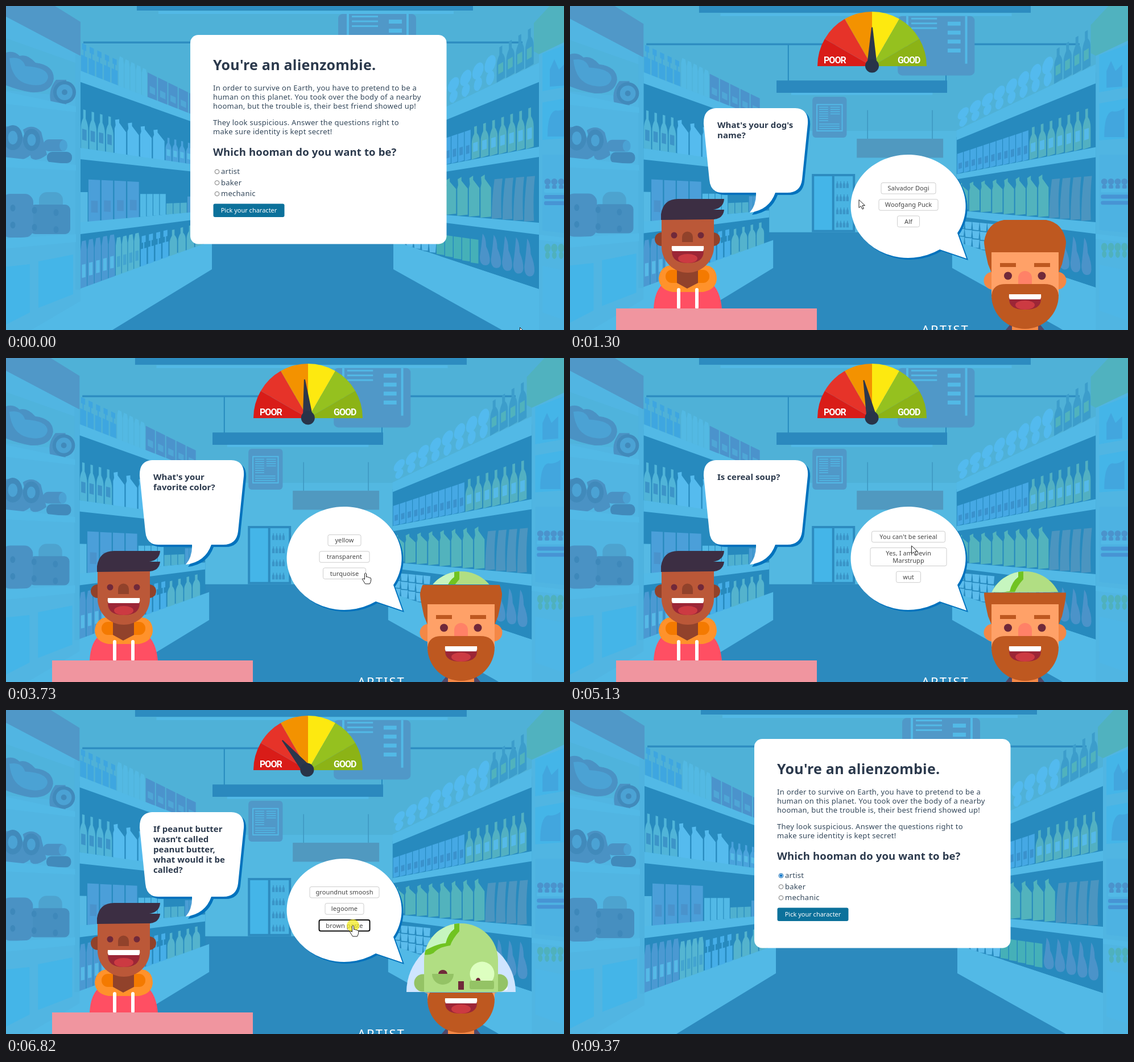
Write an HTML page that moves like this. It is 981 px wide and 571 px high and loops after 9.68 s.

```html
<!DOCTYPE html>
<html lang="en">
<head>
<meta charset="utf-8">
<title>Alienzombie quiz</title>
<style>
html,body{margin:0;width:100%;height:100%;overflow:hidden;background:#51b4dc}
svg{display:block;width:981px;height:571px}
text{font-family:"Noto Sans","Open Sans",sans-serif;fill:#33475a;white-space:pre}
.h1{font-size:25px;font-weight:700;letter-spacing:.22px;fill:#2b394c}
.h2{font-size:18.5px;font-weight:700;letter-spacing:.14px;fill:#2b394c}
.h3{font-size:19px;font-weight:700;letter-spacing:.15px;fill:#1f3440}
.p{font-size:13px;letter-spacing:.27px}
.btn{font-size:11px;font-weight:500;fill:#fff}
.q{font-size:15px;font-weight:700;letter-spacing:.03px;fill:#2b394c}
.a{font-size:11px;letter-spacing:.1px;fill:#444}
.dial{font:700 16px Roboto,"Open Sans",sans-serif;letter-spacing:-1px;fill:#fff}
.job{font-size:22px;letter-spacing:2px;fill:#fff}
.mid{text-anchor:middle}
</style>
</head>
<body>
<svg id="stage" viewBox="0 0 981 571"></svg>
<script>
const LOOP = 9680;
const rect = (x, y, w, h, fill, r = 0, more = '') =>
  `<rect x="${x}" y="${y}" width="${w}" height="${h}" rx="${r}" fill="${fill}" ${more}/>`;
const path = (d, fill, more = '') => `<path d="${d}" fill="${fill}" ${more}/>`;
const dot = (x, y, r, fill, more = '') => `<circle cx="${x}" cy="${y}" r="${r}" fill="${fill}" ${more}/>`;
const oval = (x, y, rx, ry, fill) => `<ellipse cx="${x}" cy="${y}" rx="${rx}" ry="${ry}" fill="${fill}"/>`;
const label = (x, y, cls, s) => `<text x="${x}" y="${y}" class="${cls}">${s}</text>`;
const group = (id, s, more = '') => `<g id="${id}" ${more}>${s}</g>`;
const many = (n, draw) => Array.from({length: n}, (_, i) => draw(i)).join('');

const DARK = '#278abe', LIGHT = '#52b9e6', MID = '#5098c8', BRIGHT = '#44b5e8', INK = '#2c374c';

// Product outlines in a unit box
const SHAPES = {
  box: 'M0 0H.9V1H0z',
  bottle: 'M.32 0H.62V.22Q.92.35.92.5V1H.04V.5Q.04.35.32.22z',
  jug: 'M.08.05L.4 0V.1L.94.32V1H.04V.3L.12.2z',
  carton: 'M.2 0H.75L.9.2V1H0V.2z',
  ball: 'M.5 0A.46.28 0 0 1 .5.56A.46.28 0 0 1 .5 0M.5.5A.46.26 0 0 1 .5 1A.46.26 0 0 1 .5.5',
  drop: 'M.3 0Q.6.1.62.4Q.98.65.95.85Q.9 1 .5 1Q.05 1 .05.75Q.2.4.3 0z',
  stem: 'M.2 0H.75V.22H.56V.42H.88V1H.08V.42H.4V.22H.2z',
  bag: 'M.25 0H1Q.8.4.9 1H0Q0 .5.25 0z',
  cups: 'M0 0H.95L.85.3H.1zM0 .34H.95L.85.64H.1zM0 .68H.95L.85 1H.1z'
};
function put(kind, fill, x, y, w, h, skew = 0, band) {
  const m = `transform="matrix(${w} ${skew} 0 ${h} ${x} ${y})"`;
  return path(SHAPES[kind], fill, m) + (band ? path('M.2.5H.72V.78H.2z', band, m) : '');
}

// One side of the shop: every shelf is a sloping line, and heights shrink with depth.
// goods: [kind, fill, count, end x, height at the near edge, band]
function aisle(near, far, vanish, first, shelves) {
  const depth = x => (vanish - x) / (vanish - near);
  return shelves.map(({y, slope, thick, goods}) => {
    const line = x => y + slope * Math.abs(x - near);
    let from = first;
    const items = goods.map(([kind, fill, n, to, tall, band]) => {
      const w = (to - from) / n, x0 = from, top = x => line(x) - tall * depth(x);
      from = to;
      return many(n, i => {
        const x = x0 + w * i;
        return put(kind, fill, x, top(x), w, tall * depth(x), top(x + w) - top(x), band);
      });
    }).join('');
    const board = `M${near} ${line(near)}L${far} ${line(far)}v${thick * depth(far)}L${near} ${line(near) + thick}z`;
    return items + path(board, LIGHT);
  }).join('');
}
const leftAisle = () => path('M131 124L355 212V415L131 498z', DARK) +
  aisle(131, 355, 685, 131, [
    {y: 114, slope: .393, thick: 20, goods: [['stem', '#3ea6e0', 5, 198, 50], ['carton', '#53b9e3', 5, 249, 60], ['box', '#4b93cc', 5, 340, 55, '#4fa6d6']]},
    {y: 250, slope: .147, thick: 20, goods: [['bottle', '#50b4d8', 4, 190, 69, '#3c94c8'], ['jug', '#55bbee', 4, 280, 69], ['bottle', '#4aa3dc', 6, 352, 56, '#56bbe6']]},
    {y: 381, slope: -.089, thick: 21, goods: [['box', '#55b9e4', 1, 145, 53], ['box', '#4b9fd9', 4, 236, 76, '#4a93cc'], ['box', LIGHT, 4, 282, 50], ['box', '#4fb0cf', 3, 319, 27], ['box', '#4a9dd4', 4, 349, 43]]},
    {y: 498, slope: -.364, thick: 0, goods: [['carton', '#4b99d2', 5, 193, 83, '#56b9e6'], ['carton', '#54b5d2', 4, 236, 75, '#43a4d0'], ['stem', '#46aee8', 4, 287, 66], ['bottle', '#54b3cd', 4, 347, 63]]}
  ]) + path('M131 498L362 414V464L187 571L140 600H-5V480z', LIGHT);
const rightAisle = () => path('M689 230L937 115V499L689 416z', DARK) +
  aisle(937, 689, 434, 690, [
    {y: 100, slope: .476, thick: 34, goods: [['ball', '#53baee', 8, 862, 64], ['bottle', '#3c9dcb', 4, 929, 70, '#50b2bd']]},
    {y: 248, slope: .194, thick: 18, goods: [['box', '#45a8e4', 11, 818, 70, '#3a92cd'], ['bottle', '#52b0c2', 7, 929, 74, '#55b9e8']]},
    {y: 382, slope: -.085, thick: 21, goods: [['jug', '#52b3bd', 8, 854, 95], ['bag', '#4b95c0', 4, 930, 83]]},
    {y: 482, slope: -.25, thick: 0, goods: [['cups', '#5cbcec', 5, 757, 80], ['box', '#45b0b8', 5, 832, 55], ['drop', '#4b93c9', 5, 930, 70]]}
  ]) + path('M681 414L937 499V600H920L872 571L681 464z', LIGHT);

const stripes = (x, y, w, n, gap, h = 3) => many(n, i => rect(x, y + i * gap, w, h, LIGHT));
function backWall() {
  return rect(-5, -10, 1010, 610, '#53b8e1') + rect(-5, -10, 1010, 229, '#4fb1d7') +
    rect(230, -10, 591, 18, '#2d8cc0') + rect(268, 9, 519, 5, LIGHT) +
    rect(136, 62.5, 772, 3.5, '#2e8dc1') +
    rect(388, 65, 2, 65, DARK) + rect(669, 115, 2, 16, DARK) +
    rect(584, 14, 137, 106, MID, 8) + rect(599, 14, 4, 85, LIGHT) + rect(704, 14, 4, 85, LIGHT) +
    stripes(608, 17, 46, 3, 8.5) + stripes(673, 24, 23, 4, 16, 7) +
    rect(368, 129, 304, 22, '#2b89be') + rect(394, 151, 252, 4, LIGHT) +
    rect(432, 158, 61, 73, MID, 6) + rect(439, 171, 47, 49, LIGHT) + rect(441, 173, 43, 45, MID) +
    stripes(444, 176, 16, 7, 4, 1.5) + stripes(464, 176, 17, 4, 4, 1.5) + stripes(444, 206, 36, 3, 4, 1.5) +
    rect(529.5, 182, 1.5, 52, '#3d97c0') + rect(645, 182, 1.5, 52, '#3d97c0') +
    rect(511, 233, 154, 34, '#5099c0') +
    path('M340 400H700L930 600H130z', '#2c8abe') +
    rect(431, 296, 77, 104, '#2d8bbf') + rect(435, 300, 32, 96, BRIGHT) + rect(471, 300, 33, 96, '#49b3e2') +
    many(16, i => put('bottle', '#3a95c8', 474 + i % 4 * 6, 309 + (i >> 2) * 23.5, 5, 12)) +
    rect(627, 335, 28, 22, '#50b6e8') + rect(552, 357, 104, 60, '#55bae5') + rect(552, 356, 70, 2.5, DARK) +
    many(3, i => rect(551, 374 + i * 15.5, 107, 2, '#4cb0dd'));
}
function leftFridge() {
  const meat = '#4a92c4', deep = '#418abb', cut = '#4ba2d4';
  const ring = (x, y, r) => oval(x, y, r, r * 1.3, deep) + oval(x, y, r / 2, r * .7, cut);
  return path('M-5 0H65L131 40V520L-5 600z', '#51b5e2') +
    path('M-5-10H70L131 28V88L-5 16z', MID) + path('M122 85L131 88V500H122z', '#4eb2df') +
    path('M-5 55L122 100V160L-5 148z', '#4fb3dc') +
    path('M-4 84Q12 76 24 88Q38 84 52 100Q84 104 84 128Q80 154 44 152Q20 148-4 138z', meat) +
    path('M6 92Q28 88 34 106Q74 108 74 126Q70 144 40 138Q10 132 6 92z', cut) +
    path('M88 130H106V174H80Q72 150 88 130z', meat) + dot(103, 152, 20, deep) + dot(103, 152, 14, cut) + dot(103, 152, 5, deep) +
    path('M-5 150L123 177V187L-5 172z', LIGHT) +
    path('M-5 214Q10 208 24 218L44 262Q24 280-5 264z', meat) + ring(12, 232, 17) +
    path('M30 218Q48 206 62 222L72 262Q54 276 44 268z', meat) + ring(45, 236, 15) +
    rect(66, 235, 41, 21, meat, 9) + rect(72, 257, 44, 20, deep, 9) + oval(101, 246, 7, 10, cut) +
    path('M-5 266L123 280V290L-5 284z', LIGHT) +
    rect(58, 328, 42, 40, '#4da3cf', 14) + rect(42, 350, 71, 52, '#468fc0', 9) + rect(-8, 331, 56, 77, meat, 15) +
    many(6, i => oval(12 + (i >> 1) * 38, 356 + i % 2 * 30 + (i >> 1) * 4, 4.5, 6, '#3e88ba')) +
    path('M-5 410L123 402V416L-5 428z', LIGHT) +
    path('M-5 460L42 455V540L-5 564z', BRIGHT) + path('M57 450L118 438V508L57 532z', BRIGHT);
}
function rightFridge() {
  const punnets = (fill, y, h) => many(4, i => put('ball', fill, 946 + i * 12, y, 12, h));
  return path('M937 60L1000 30V600H937z', '#50b5e2') + path('M928 30L965-10H1000V55L937 85L928 80z', '#50b2bf') +
    path('M943 84L1000 62V140L943 150z', BRIGHT) + path('M956 142V112L964 94L972 112L984 100V140z', '#42a6de') +
    path('M943 170L1000 160V232L943 236z', BRIGHT) + path('M952 230Q952 188 966 184Q978 186 988 178V230z', '#42a6de') +
    path('M943 262H1000V402L943 396z', '#4db2e2') + punnets('#4b93cc', 304, 20) +
    many(3, i => rect(946, 322 + i * 11, 50, 7, i ? '#4794d4' : LIGHT, 3)) +
    path('M937 403L1000 410V420L937 412z', LIGHT) + punnets('#4fb1bd', 419, 27) +
    path('M943 458L1000 470V560L943 540z', '#4eb6e6');
}

const EYE = '#70293a';
function mouth(x, y, h) {
  return path(`M${x} ${y}h56v9q0 ${h}-28 ${h}q-28 0-28-${h}z`, '#9c2636') +
    oval(x + 28, y + h + 1, 17, 8, '#cc3a42') + path(`M${x} ${y}h56q1 5-1 9h-54q-2-4-1-9z`, '#fff');
}
function friend() {
  const shade = '#91422b';
  return path('M147 534Q149 488 180 482H234Q263 488 267 534z', '#ff4f63') +
    path('M176 457H238Q258 459 258 482Q256 500 234 504H180Q157 500 156 480Q158 460 176 457z', '#ff922b') +
    rect(168, 465, 77, 23, '#f47a00', 11) + path('M188 455H225V488L206 498L188 488z', shade) +
    rect(188, 497, 6, 37, '#fff', 3) + rect(220, 497, 6, 37, '#fff', 3) +
    dot(161, 411, 12, shade) + dot(252, 411, 12, shade) +
    path('M161 370H253V424A46 46 0 0 1 161 424z', '#bb5838') +
    path('M160 377V367Q164 340 190 340H271Q270 356 252 359H271Q269 376 250 376z', '#3c2e43') +
    dot(183, 404, 5.5, EYE) + dot(230, 404, 5.5, EYE) + path('M197 416V407A9.5 9.5 0 0 1 216 407V416z', shade) +
    mouth(179, 423, 21) + rect(81, 533, 353, 40, '#f0959f');
}
function man() {
  const hair = '#be5820', ear = '#f48846';
  return path('M765 572L778 556H822L835 572z', '#51496a') + rect(777, 545, 46, 30, ear) +
    dot(743, 484, 15.5, ear) + dot(857, 484, 15.5, ear) +
    path('M741 470L735 455Q728 425 728 415Q734 377 773 376H827Q866 377 872 415Q872 425 865 455L859 470z', hair) +
    rect(741, 434, 118, 80, '#ffa168') +
    rect(756, 453, 28, 7, hair) + rect(816, 453, 28, 7, hair) + dot(770, 475.5, 7, EYE) + dot(829.5, 475.5, 7, EYE) +
    path('M788 492V479A12 12 0 0 1 812 479V492z', '#ff8167') +
    path('M741 510Q743 490 766 490H834Q857 490 859 510A59 59 0 0 1 741 510z', hair) + mouth(772, 508, 18);
}
function zombie() {
  const skin = '#b1de83', lid = '#94c365', head = 'M735 500V441A65 65 0 0 1 865 441V500z';
  return dot(800, 497, 96, '#cfe5ff') + dot(878, 490, 4, '#f4faff') +
    dot(733, 481, 15.5, lid) + dot(867, 481, 15.5, lid) + path(head, skin) +
    `<clipPath id="skull"><path d="${head}"/></clipPath><g clip-path="url(#skull)">` +
    path('M730 374H797V388Q788 400 782 412Q750 415 735 428z', '#c6f5bf') +
    path('M788 374H797V390Q786 402 781 415Q760 418 752 428Q742 434 730 430L738 423Q760 411 773 411Q777 394 788 386z', '#70c321') + '</g>' +
    path('M749 465H787A19 19 0 0 1 749 465z', lid) + path('M760 465A8 7 0 0 1 776 465z', EYE) +
    dot(837, 465, 21.5, '#ddffc0') + rect(815, 477, 43, 15, lid, 3) + path('M826 477A4 5 0 0 1 834 477z', EYE) +
    rect(795, 478, 10, 15, EYE);
}
function gauge() {
  const cols = ['#d91c18', '#e63329', '#f39200', '#fde910', '#95c11f', '#8cb316'];
  const at = i => `${531 - 96 * Math.cos(i * Math.PI / 6)} ${106 - 96 * Math.sin(i * Math.PI / 6)}`;
  return cols.map((c, i) => path(`M531 106L${at(i)}A96 96 0 0 1 ${at(i + 1)}z`, c)).join('') +
    label(446, 101, 'dial', 'POOR') + label(576, 101, 'dial', 'GOOD') +
    group('needle', path('M-9 0L-1 -68H1L9 0z', INK) + dot(0, 0, 12, '#283449'));
}
function bubbles() {
  const left = 'M257 180H396Q420 181 418 208L408 306Q405 329 382 329H361Q350 360 316 364Q328 350 327 329H268Q247 329 245 306L235 208Q234 181 257 180z';
  const right = 'M650 429A101 91 0 1 1 681 400L697 445z';
  return path(left, '#0272bd', 'transform="translate(4 4)"') + path(left, '#fff') +
    path(right, '#0272bd', 'transform="translate(3 3)"') + path(right, '#fff');
}
const button = ([x, y, w, h], s) => rect(x, y, w, h, '#0c719b', 3) + label(x + w / 2, y + 15.5, 'btn mid', s);
const PICK = [364.5, 348.5, 125, 23.5], AGAIN = [477.5, 195, 109.5, 24];
function intro() {
  const story = (y, ...lines) => lines.map((s, i) => label(364, y + i * 16, 'p', s)).join('');
  return rect(324, 51, 450.5, 368.5, '#fff', 14) + label(364, 113, 'h1', "You're an alienzombie.") +
    story(149, 'In order to survive on Earth, you have to pretend to be a', 'human on this planet. You took over the body of a nearby',
      'hooman, but the trouble is, their best friend showed up!') +
    story(210, 'They look suspicious. Answer the questions right to', 'make sure identity is kept secret!') +
    label(364, 264, 'h2', 'Which hooman do you want to be?') +
    ['artist', 'baker', 'mechanic'].map((s, i) =>
      dot(371, 292 + i * 19.5, 3.8, '#fff', 'stroke="#777"') + label(378, 296 + i * 19.5, 'p', s)).join('') +
    group('picked', dot(371, 292, 3.8, '#fff', 'stroke="#0e75c8"') + dot(371, 292, 2.4, '#0e75c8')) +
    button(PICK, 'Pick your character');
}
function lost() {
  const ink = '#2b2f38';
  return rect(324, 51, 417, 228, '#fff', 14) + label(532, 105, 'h3 mid', 'You lost') +
    dot(532, 149, 23, '#fbb03f', `stroke="${ink}" stroke-width="1.2"`) + dot(521.5, 149, 2.8, ink) + dot(543, 149, 2.8, ink) +
    path('M520 137Q529 131 538 137Q529 138.5 520 137z', ink) + button(AGAIN, "Let's play again!");
}

const PLAY = 1190, LOST = 6890, AGAIN_AT = 8290;
// turn and cut: needle angle and reveal height once the question is on screen
const QUIZ = [
  {from: 0, turn: 0, cut: 376, ask: ["What's your dog's", 'name?'], answers: [[96, 'Salvador Dogi'], [104, 'Woofgang Puck'], [39, 'Alf']]},
  {from: 2320, turn: -5, cut: 399, ask: ["What's your", 'favorite color?'], answers: [[58, 'yellow'], [88, 'transparent'], [75, 'turquoise']]},
  {from: 3880, turn: -9, cut: 407, ask: ["What's your", 'favorite food?'], answers: [[54, 'tacos'], [62, 'brains'], [78, 'pancakes']]},
  {from: 4980, turn: -14, cut: 416, ask: ['Is cereal soup?'],
    answers: [[129, "You can't be serieal"], [134, 'Yes, I am Devin', 'Marstrupp'], [43, 'wut']]},
  {from: 6040, turn: -40, cut: 497, ask: ['If peanut butter', 'wasn’t called', 'peanut butter,', 'what would it be', 'called?'],
    answers: [[122, 'groundnut smoosh'], [68, 'legoome'], [89, 'brown paste']]}
];
// Each click shows for CLICK ms, and the answer follows after the same wait
const CLICK = 230;
const clicks = [...QUIZ.slice(1).map(q => q.from - 2 * CLICK), LOST - CLICK];
// Pointer glides: start, end, x, y
const GLIDES = [[70, 900, 372, 288], [1000, 1150, 425, 358], [1150, 1300, 507, 341], [1300, 1690, 604, 352], [2320, 3180, 632, 379],
  [3880, 4350, 600, 350], [4980, 5430, 600, 315], [6040, 6520, 610, 380], [7290, 7750, 553, 236], [7750, 8220, 487, 213], [8290, 9370, 940, 590]];

const $ = id => document.getElementById(id);
$('stage').innerHTML =
  group('scene', backWall() + leftAisle() + rightAisle() + leftFridge() + rightFridge()) +
  group('game', gauge() + bubbles() + group('quiz', '') + friend() +
    '<clipPath id="above"><rect id="aboveBox" x="690" y="360" width="220"/></clipPath>' +
    '<clipPath id="below"><rect id="belowBox" x="690" width="220" height="300"/></clipPath>' +
    group('undead', zombie(), 'clip-path="url(#above)"') + group('living', man(), 'clip-path="url(#below)"') +
    label(618, 579, 'job', 'ARTIST')) +
  group('intro', intro()) + group('lost', lost()) +
  group('mouse', dot(0, 0, 11, '#f2ea22', 'id="glow" opacity=".75"') +
    path('M.5.5V14.5L4 11.5L6.5 17L8.8 16L6.5 10.5H11z', '#fff', 'id="arrow" stroke="#222"') +
    path('M-1.5 1Q0-1.5 1.5 1V7Q3 5.5 4.5 7.5Q6 6.5 7.2 8.5Q9.5 7.5 9.8 10.5Q10 15 7.5 19H-.5Q-3 15-5.5 11Q-5.5 8.5-1.5 11z', '#fff', 'id="hand" stroke="#222"'));

const show = (id, on) => { $(id).style.display = on ? '' : 'none'; };
const clamp = u => Math.min(1, Math.max(0, u));
const mix = (a, b, u) => a + (b - a) * u;
const easeOut = u => 1 - (1 - u) ** 2;

function pointer(t) {
  let x = 903, y = 566;
  for (const [a, b, tx, ty] of GLIDES) {
    const u = easeOut(clamp((t - a) / (b - a)));
    x = mix(x, tx, u);
    y = mix(y, ty, u);
  }
  return [x, y];
}

let drawn = '', boxes = [];
function drawQuiz(n, focus) {
  const key = `${n} ${focus}`;
  if (drawn === key) return;
  drawn = key;
  const {ask, answers} = QUIZ[n];
  const heights = answers.map(a => a.length > 2 ? 32 : 19.5);
  let y = 350.5 - (heights.reduce((a, b) => a + b) + 19.5) / 2;
  boxes = answers.map(([w], i) => {
    const box = [595 - w / 2, y, w, heights[i]];
    y += heights[i] + 9.7;
    return box;
  });
  $('quiz').innerHTML = ask.map((s, i) => label(259, 215 + i * 18, 'q', s)).join('') +
    answers.map(([, ...lines], i) => {
      const on = focus && i === 2, [, top, , h] = boxes[i];
      return rect(...boxes[i], '#fff', 3, `stroke="${on ? '#111' : '#cdcdcd'}" stroke-width="${on ? 2 : 1}"`) +
        lines.map((s, j) => label(595, top + h / 2 + 4 + (j - (lines.length - 1) / 2) * 12.5, 'a mid', s)).join('');
    }).join('');
}

function drawScore(n, t) {
  const now = QUIZ[n], last = QUIZ[Math.max(0, n - 1)], u = easeOut(clamp((t - now.from) / 400));
  const turn = mix(last.turn, now.turn, u), cut = mix(last.cut, now.cut, u);
  $('needle').setAttribute('transform', `translate(${531 + turn * .04} 105.5) rotate(${turn})`);
  $('aboveBox').setAttribute('height', cut - 360);
  $('belowBox').setAttribute('y', cut + 1);
}

function frame(t) {
  const playing = t >= PLAY && t < LOST, over = t >= LOST && t < AGAIN_AT;
  show('game', playing);
  show('lost', over);
  show('intro', !playing && !over);
  show('picked', t >= 930);
  $('scene').setAttribute('transform', playing ? 'matrix(.9866 0 0 .9866 0 4)' : '');

  const n = QUIZ.filter(q => q.from <= t).length - 1;
  const clicking = clicks.some(a => t >= a && t < a + CLICK);
  drawQuiz(n, clicking && n === QUIZ.length - 1);
  drawScore(n, t);

  const [x, y] = pointer(t);
  const spots = playing ? boxes : over ? [AGAIN] : [PICK];
  const hover = spots.some(([l, top, w, h]) => x >= l && x <= l + w + 1 && y >= top && y <= top + h);
  $('mouse').setAttribute('transform', `translate(${x} ${y})`);
  show('glow', clicking);
  show('hand', hover);
  show('arrow', !hover);
}
const start = performance.now();
function tick() {
  frame((performance.now() - start) % LOOP);
  requestAnimationFrame(tick);
}
tick();
</script>
</body>
</html>
```
